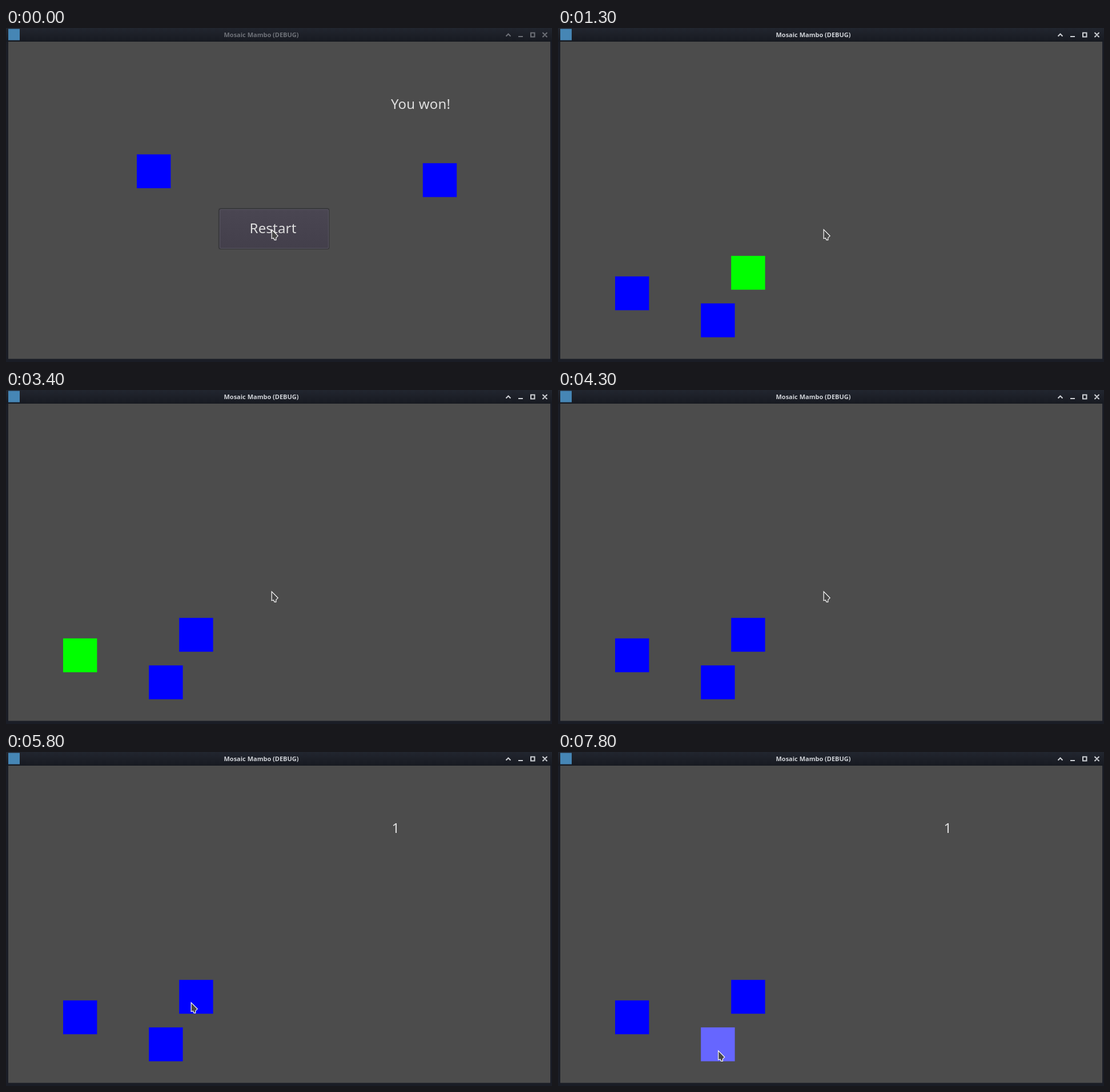
Recreate the animation shown at these times as an HTML page. Size 956x586 px, loop 8 s.

```html
<!DOCTYPE html>
<html lang="en">
<head>
<meta charset="utf-8">
<title>Mosaic Mambo</title>
<style>
  html, body { margin: 0; width: 100%; height: 100%; overflow: hidden; background: #1a1d26; }
  svg { display: block; }
  text { font-family: "Noto Sans", sans-serif; }
  .game { font-size: 24px; letter-spacing: .2px; fill: #dedede; }
  #bar { color: #6e7178; }
  #bar.focused { color: #ced1d6; }
  #bar path { fill: none; stroke: currentColor; stroke-width: 2; }
  #caption { font-size: 11px; font-weight: 700; text-anchor: middle; fill: currentColor; }
  #face { fill: url(#raised); stroke: #5a5764; }
  .pressed #face { fill: url(#sunken); stroke: #4b6485; }
</style>
</head>
<body>
<svg width="956" height="586" viewBox="0 0 956 586">
  <defs>
    <linearGradient id="chrome" x2="0" y2="1">
      <stop stop-color="#22262f"/><stop offset="1" stop-color="#171a21"/>
    </linearGradient>
    <linearGradient id="raised" x2="0" y2="1">
      <stop stop-color="#4a4652"/><stop offset="1" stop-color="#433f4b"/>
    </linearGradient>
    <linearGradient id="sunken" x2="0" y2="1">
      <stop stop-color="#0c0c0e"/><stop offset="1" stop-color="#32313a"/>
    </linearGradient>
  </defs>

  <rect width="956" height="586" fill="#1a1d26"/>
  <g id="bar">
    <rect width="956" height="24" fill="url(#chrome)"/>
    <rect x="4" y="1.5" width="20" height="20" fill="#4686b5"/>
    <text id="caption" x="447" y="16">Mosaic Mambo (DEBUG)</text>
    <path d="M875.5 14.5l4-4 4 4M897 15h8M919 8.500h6.500v7h-6.500zM939.500 8l8 8m0-8l-8 8"/>
  </g>
  <rect x="4" y="24" width="949" height="556.500" fill="#4c4c4c"/>

  <g id="tiles"></g>
  <text id="message" class="game" y="142"></text>
  <g id="button">
    <rect x="371.5" y="315.5" width="195.500" height="73.500" rx="4" fill="#454547"/>
    <rect x="372.5" y="316.5" width="193.500" height="71.500" rx="3" fill="#353538"/>
    <rect id="face" x="374.500" y="318.500" width="190" height="68" rx="1.500"/>
    <text class="game" x="426.500" y="359.500">Restart</text>
  </g>
  <path id="cursor" d="M.7 .7V16.500L4 15.500 5.500 18.800H8.300V15.200L11.700 11.800Z"
        fill="#474747" stroke="#fff" stroke-width="1.200"/>
</svg>
<script>
const LOOP = 8000;
const $ = id => document.getElementById(id);
const BLUE = '#00f', GREEN = '#0f0', HOVER = '#6666ff';
const FINISHED = [[229, 221.7], [729.8, 237.2]];
const ROUND = [[303.2, 399.8], [250.2, 483.2], [100, 435.8]];

// [start, highlighted tile, highlight colour]
const HIGHLIGHTS = [
  [0, -1], [1300, 0, GREEN], [2300, 1, GREEN], [3400, 2, GREEN], [4300, -1],
  [5300, 0, HOVER], [5800, -1], [6900, 0, HOVER], [7400, 1, HOVER]
];
// [start, x, y]
const POINTER = [
  [0, 464.5, 353], [5300, 323, 439], [5600, 323.5, 439],
  [6900, 312, 464], [7400, 279, 523], [7800, 280, 523.5]
];

const at = (steps, t) => steps.filter(([start]) => start <= t).pop();

const tiles = ROUND.map(() => {
  const tile = document.createElementNS('http://www.w3.org/2000/svg', 'rect');
  tile.setAttribute('width', 59.4);
  tile.setAttribute('height', 59.4);
  return $('tiles').appendChild(tile);
});

function draw(t) {
  const playing = t >= 1300;
  const places = playing ? ROUND : FINISHED;
  const [, lit, colour] = at(HIGHLIGHTS, t);
  tiles.forEach((tile, i) => {
    tile.style.display = places[i] ? '' : 'none';
    if (!places[i]) return;
    tile.setAttribute('x', places[i][0]);
    tile.setAttribute('y', places[i][1]);
    tile.setAttribute('fill', i === lit ? colour : BLUE);
  });

  $('bar').classList.toggle('focused', t >= 1100);
  $('button').classList.toggle('pressed', t >= 1200);
  $('button').style.display = playing ? 'none' : '';
  $('message').textContent = !playing ? 'You won!' : t >= 5800 ? '1' : '';
  $('message').setAttribute('x', playing ? 675.5 : 674);

  const [, x, y] = at(POINTER, t);
  $('cursor').setAttribute('transform', `translate(${x} ${y})`);
}

const begin = performance.now();
function tick() {
  draw((performance.now() - begin) % LOOP);
  requestAnimationFrame(tick);
}
tick();
</script>
</body>
</html>
```
